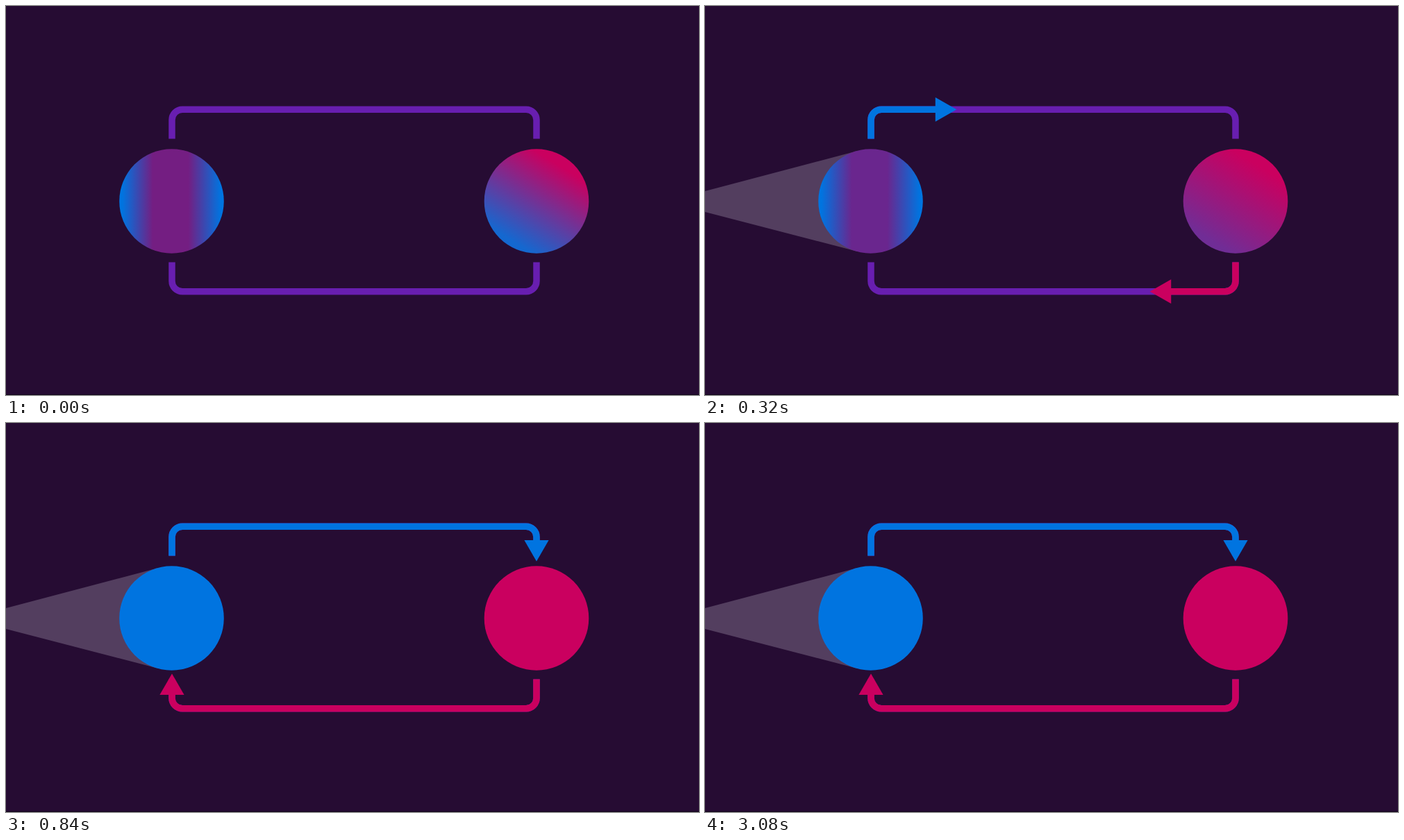
Recreate the animation shown at these times as an HTML page. Size 998 by 561 pixels, loop 4 s.

```html
<!DOCTYPE html>
<html lang="en">
<head>
<meta charset="utf-8">
<title>Exchange loop</title>
<style>
  html, body { margin: 0; width: 100%; height: 100%; overflow: hidden; background: #260c33; }
  svg { display: block; width: 998px; height: 561px; }
  .track, .trail { fill: none; stroke-width: 9.5; }
  .track { stroke: #681eb0; }
</style>
</head>
<body>
<svg viewBox="0 0 998 561">
  <defs>
    <path id="route" d="M239 191.5V164.25A15 15 0 0 1 254 149.25H749A15 15 0 0 1 764 164.25V191.5"/>
    <linearGradient id="band">
      <stop offset="0.03" stop-color="#0074e0"/>
      <stop class="core" offset="0.32"/>
      <stop class="core" offset="0.66"/>
      <stop offset="0.97" stop-color="#0074e0"/>
    </linearGradient>
    <linearGradient id="slope" gradientUnits="userSpaceOnUse" x1="727" y1="338" x2="795" y2="229">
      <stop id="low" offset="0"/>
      <stop offset="1" stop-color="#ca005f"/>
    </linearGradient>
  </defs>
  <rect width="998" height="561" fill="#260c33"/>
  <rect y="560" width="998" height="1" fill="#12061a"/>
  <path id="beam" d="M0 267L219.4 209V354L0 297Z" fill="#533e5f"/>
  <circle cx="238.5" cy="281.5" r="75.3" fill="url(#band)"/>
  <circle cx="764" cy="281.5" r="75.3" fill="url(#slope)"/>
  <g class="lane" fill="#0074e0" stroke="#0074e0">
    <use href="#route" class="track"/>
    <use href="#route" class="trail"/>
    <path class="head" d="M0 -17.6L30.6 0L0 17.6Z" stroke="none"/>
  </g>
  <g class="lane" fill="#ca005f" stroke="#ca005f" transform="rotate(180 501.5 280.5)">
    <use href="#route" class="track"/>
    <use href="#route" class="trail"/>
    <path class="head" d="M0 -17.6L30.6 0L0 17.6Z" stroke="none"/>
  </g>
</svg>
<script>
  const LOOP = 4000, STEP = 40, HEAD = 30.6;
  const $ = id => document.getElementById(id);
  const all = selector => document.querySelectorAll(selector);
  const route = $('route');
  const length = route.getTotalLength();
  const travel = length + 8;

  // [time, red, green, blue]
  const coreKeys = [[0, 116, 30, 130], [80, 131, 22, 120], [320, 106, 38, 142], [400, 0, 116, 224]];
  const lowKeys = [[0, 20, 104, 208], [80, 42, 92, 196], [320, 112, 45, 150], [400, 202, 0, 95]];

  const clamp = v => Math.min(1, Math.max(0, v));
  const easeInOut = p => p < 0.5 ? 4 * p ** 3 : 1 - 4 * (1 - p) ** 3;

  function colorAt(keys, t) {
    const next = keys.findIndex(key => key[0] > t);
    const b = next < 0 ? keys[keys.length - 1] : keys[next];
    const a = next < 0 ? b : keys[next - 1];
    const p = a === b ? 0 : (t - a[0]) / (b[0] - a[0]);
    return `rgb(${[1, 2, 3].map(i => Math.round(a[i] + (b[i] - a[i]) * p))})`;
  }

  function draw(t) {
    $('beam').style.display = t < 40 ? 'none' : '';
    all('.core').forEach(stop => stop.setAttribute('stop-color', colorAt(coreKeys, t)));
    $('low').setAttribute('stop-color', colorAt(lowKeys, t));

    const tip = travel * easeInOut(clamp((t - 158.5) / 400));
    const base = Math.max(0, tip - HEAD);
    const at = route.getPointAtLength(base);
    const from = route.getPointAtLength(Math.max(0, base - 0.5));
    const to = route.getPointAtLength(base + 0.5);
    const angle = Math.atan2(to.y - from.y, to.x - from.x) * 180 / Math.PI;
    const size = clamp(tip / HEAD);

    all('.trail').forEach(trail => {
      trail.style.display = base > 0 ? '' : 'none';
      trail.setAttribute('stroke-dasharray', `${base + 1} ${length * 2}`);
    });
    all('.head').forEach(head => {
      head.style.display = size > 0 ? '' : 'none';
      head.setAttribute('transform', `translate(${at.x} ${at.y}) rotate(${angle}) scale(${size})`);
    });
  }

  const start = performance.now();
  function frame() {
    const t = (performance.now() - start) % LOOP;
    draw(Math.floor(t / STEP) * STEP);
    requestAnimationFrame(frame);
  }
  frame();
</script>
</body>
</html>
```
